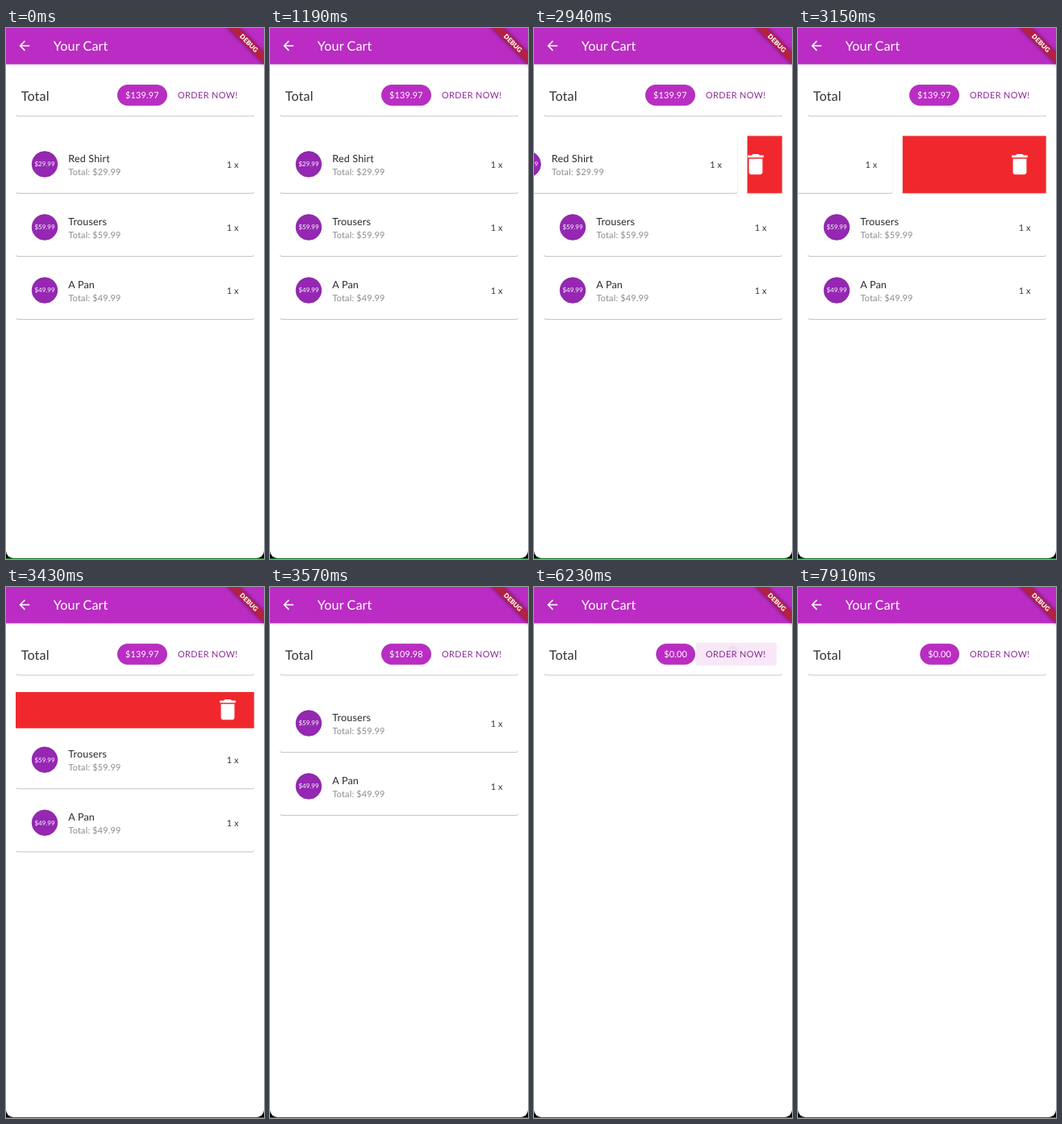
Recreate the animation shown at these times as an HTML page. Size 320 by 657 pixels, loop 8 s.

```html
<!DOCTYPE html>
<html lang="en">
<head>
<meta charset="utf-8">
<title>Your Cart</title>
<style>
  html, body { margin: 0; width: 100%; height: 100%; overflow: hidden; background: #000; }
  #stage { position: relative; width: 320px; height: 657px; overflow: hidden; background: #000; }
  #screen { position: absolute; inset: 0 0 1.5px; overflow: hidden; background: #fff; border-radius: 0 0 9px 9px; }
  #base { position: absolute; inset: auto 0 0; height: 1.5px; background: #0a781e; }
  svg { position: absolute; left: 0; top: 0; display: block; }
  text { font-family: Lato, sans-serif; font-size: 10.9px; letter-spacing: .17px; fill: #333; text-rendering: geometricPrecision; }
  .card { fill: #fff; filter: drop-shadow(0 1.1px .6px rgba(0,0,0,.22)); }
  .heading { font-size: 16.2px; letter-spacing: .1px; }
  .name { font-size: 12.6px; letter-spacing: .15px; fill: #2a2a2a; }
  .sub { fill: #8a8a8a; }
  .count { letter-spacing: 0; }
  .price { font-size: 8px; letter-spacing: 0; fill: #fff; text-anchor: middle; }
  .light { fill: #fff; }
  .order { letter-spacing: .38px; fill: #8d2997; }
  .debug { font: 900 8.1px Lato, sans-serif; letter-spacing: 0; fill: #fff; text-anchor: middle; }
  .avatar { fill: #9527b3; stroke: #85209f; stroke-width: .8px; }
  .chip { fill: #ba2dc3; stroke: #a626b0; stroke-width: .8px; }
  #ripple { transform-origin: 247px 80px; }
  #bin { position: absolute; top: 129.5px; width: 320px; height: 78px; overflow: hidden; }
  #bin svg { top: 50%; margin-top: -39px; }
  #rest { position: absolute; top: 0; left: 0; }
</style>
</head>
<body>
<div id="stage">
  <div id="screen">
    <svg width="320" height="130">
      <defs><clipPath id="button"><rect x="201" y="69" width="100" height="28" rx="1.5"/></clipPath></defs>
      <rect class="card" x="12" y="57" width="296" height="51.6" rx="3"/>
      <text class="heading" x="18.8" y="89.5">Total</text>
      <g id="totals"></g>
      <g clip-path="url(#button)">
        <rect id="highlight" x="201" y="69" width="100" height="28" fill="#f8e8f8"/>
        <circle id="ripple" cx="247" cy="80" r="52" fill="#ba2dc3"/>
      </g>
      <text class="order" x="213" y="87.2">ORDER NOW!</text>
    </svg>

    <div id="bin">
      <svg width="320" height="78">
        <rect x="12" y="3.5" width="295.7" height="71" fill="#f0282d"/>
        <path fill="#fff" transform="translate(258.2 21.9) scale(1.4)"
          d="M6 19c0 1.1.9 2 2 2h8c1.1 0 2-.9 2-2V7H6v12zM19 4h-3.5l-1-1h-5l-1 1H5v2h14V4z"/>
      </svg>
    </div>
    <div id="rows"><div id="rest"></div></div>

    <svg width="320" height="60">
      <rect width="320" height="44.8" fill="#ba2cc3" style="filter:drop-shadow(0 1.2px 1.6px rgba(0,0,0,.16))"/>
      <path fill="#fff" transform="translate(13.2 12.4) scale(.8)"
        d="M20 11H7.83l5.59-5.59L12 4l-8 8 8 8 1.41-1.41L7.83 13H20v-2z"/>
      <text class="heading light" x="58.8" y="28.3">Your Cart</text>
      <g transform="translate(320 0) rotate(45)">
        <rect x="-34" y="21.6" width="68" height="9.8" fill="#b51f43" style="filter:drop-shadow(0 0 2.5px rgba(0,0,0,.5))"/>
        <text class="debug" y="29.4">DEBUG</text>
      </g>
    </svg>
  </div>
  <div id="base"></div>
</div>
<script>
const LOOP = 8000;
const REMOVED = 3565, ORDERED = 5870;
const $ = id => document.getElementById(id);

// steps: [time in ms, value, easing towards the next step]
function play(el, prop, steps) {
  const all = [...steps, [LOOP, steps.at(-1)[1]]];
  const frames = all.map(([ms, value, easing = 'linear']) => ({ offset: ms / LOOP, [prop]: value, easing }));
  el.animate(frames, { duration: LOOP, iterations: Infinity });
}

const showBetween = (el, from, to) => play(el, 'opacity', [
  [0, from ? 0 : 1, 'step-end'],
  ...(from ? [[from, 1, 'step-end']] : []),
  ...(to < LOOP ? [[to, 0, 'step-end']] : [])
]);

function addRow(parent, top, name, price) {
  parent.insertAdjacentHTML('beforeend', `
    <svg width="320" height="78" style="top:${top}px">
      <rect class="card" x="12" y="3" width="296" height="71" rx="3"/>
      <circle class="avatar" cx="48" cy="38.5" r="15.8"/>
      <text class="price" x="48" y="41.4">${price}</text>
      <text class="name" x="77.3" y="35.6">${name}</text>
      <text class="sub" x="77.5" y="51.8">Total: ${price}</text>
      <text class="count" x="273.8" y="43">1 x</text>
    </svg>`);
  return parent.lastElementChild;
}

function addTotal(value, left, from, to) {
  $('totals').insertAdjacentHTML('beforeend', `
    <g><rect class="chip" x="${left + .4}" y="70.4" width="${199.2 - left}" height="25.4" rx="12.7"/>
    <text class="light" x="${left + 10}" y="87.2">${value}</text></g>`);
  showBetween($('totals').lastElementChild, from, to);
}

addTotal('$139.97', 138, 0, REMOVED);
addTotal('$109.98', 138, REMOVED, ORDERED);
addTotal('$0.00', 151.3, ORDERED, LOOP);

const swiped = addRow($('rows'), 130, 'Red Shirt', '$29.99');
addRow($('rest'), 208, 'Trousers', '$59.99');
addRow($('rest'), 286, 'A Pan', '$49.99');

// Swipe the first row away; the bin shows only where the row has left.
const swipe = [[0, 0], [2740, 0], [2870, 22], [3010, 88], [3150, 189], [3255, 320]];
play(swiped, 'transform', swipe.map(([ms, dx]) => [ms, `translateX(${-dx}px)`]));
play($('bin'), 'clipPath', swipe.map(([ms, dx]) => [ms, `inset(0 0 0 ${320 - dx}px)`]));

// Collapse the gap.
const collapse = (el, prop, open, shut) =>
  play(el, prop, [[0, open], [REMOVED - 180, open, 'ease'], [REMOVED, shut]]);
collapse($('bin'), 'height', '78px', '0px');
collapse($('rest'), 'transform', 'translateY(0px)', 'translateY(-78px)');
showBetween($('rest'), 0, ORDERED);

// Two taps on the order button.
play($('highlight'), 'opacity', [
  [0, 0], [5800, 0], [5880, .8], [5950, .8], [6080, .1], [6110, .1],
  [6215, 1], [6340, 1], [6560, 0]
]);
play($('ripple'), 'transform', [
  [0, 'scale(0)'], [5800, 'scale(0)'], [5900, 'scale(1)'], [6090, 'scale(1)', 'step-end'],
  [6110, 'scale(0)'], [6230, 'scale(.14)'], [6330, 'scale(.28)'], [6420, 'scale(1)']
]);
play($('ripple'), 'opacity', [
  [0, .07], [5860, .07], [6060, 0, 'step-end'], [6110, .07], [6330, .07], [6540, 0]
]);
</script>
</body>
</html>
```
